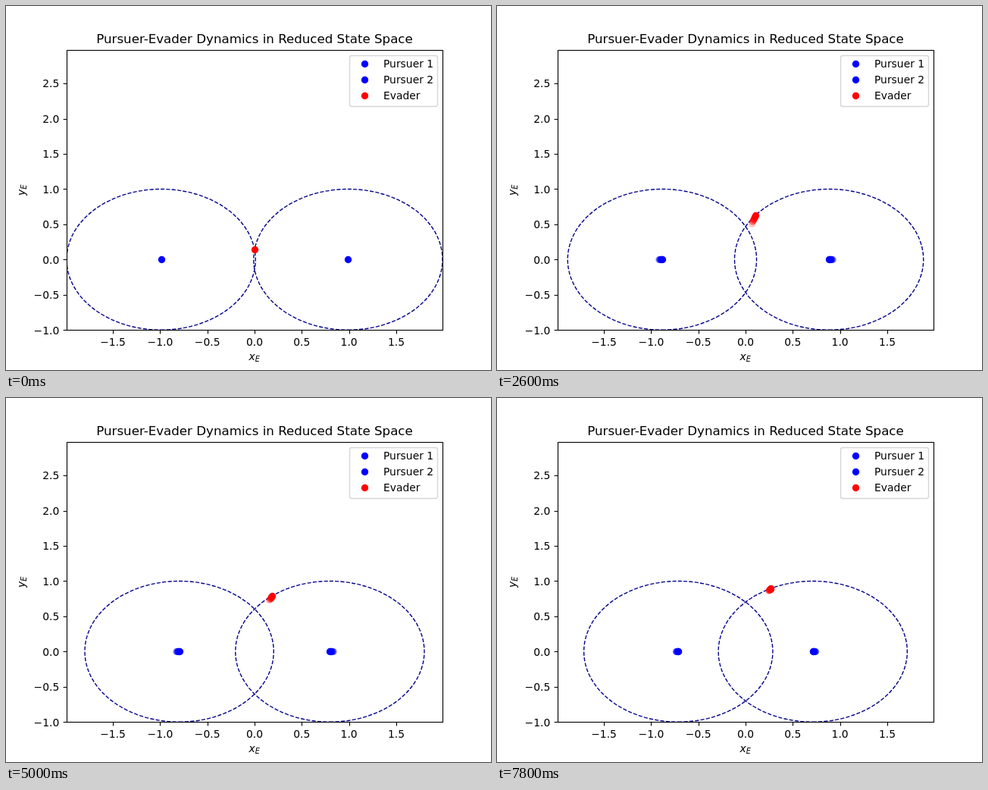
Write an HTML page with a canvas that moves like this. It is 640 by 480 pixels and loops after 8 s.

```html
<!DOCTYPE html>
<html lang="en">
<head>
<meta charset="utf-8">
<title>Pursuer-Evader Dynamics</title>
<style>
html, body { margin: 0; width: 100%; height: 100%; overflow: hidden; background: #fff; }
canvas { display: block; }
</style>
</head>
<body>
<canvas id="plot" width="640" height="480"></canvas>
<script>
const ctx = document.getElementById('plot').getContext('2d');
const STEP = 200, STEPS = 40, TRAIL = 6;
const SCALE_X = 496 / 3.98, SCALE_Y = 369.6 / 3.98;
const LEFT = 80, RIGHT = 576, TOP = 58, BOTTOM = 427;
const START = 0.99; // initial distance of each pursuer from the centre
const px = x => 328 + x * SCALE_X;
const py = y => 427.2 - (y + 1) * SCALE_Y;
const snap = v => Math.round(v) + 0.5;

function text(str, x, y, align = 'left', size = 13.89, style = '') {
  ctx.font = `${style} ${size}px "DejaVu Sans", sans-serif`;
  ctx.textAlign = align;
  ctx.fillStyle = '#000';
  ctx.fillText(str, x, y);
}

function line(x1, y1, x2, y2) {
  ctx.beginPath();
  ctx.moveTo(x1, y1);
  ctx.lineTo(x2, y2);
  ctx.stroke();
}

function dot(x, y, color, alpha = 1) {
  ctx.globalAlpha = alpha;
  ctx.fillStyle = ctx.strokeStyle = color;
  ctx.lineWidth = 1.39;
  ctx.beginPath();
  ctx.arc(snap(x), snap(y), 4, 0, 2 * Math.PI);
  ctx.fill();
  ctx.stroke();
  ctx.globalAlpha = 1;
}

// Pursuers close in while the evader slides along the right capture circle.
function stateAt(step) {
  const t = step * STEP / 1000;
  const closed = 0.0436 * t - 0.00102 * t * t;
  const pursuer = START - closed;
  const evader = 0.965 * closed;
  return { pursuer, evader, height: Math.sqrt(1 - (pursuer - evader) ** 2) };
}

function captureCircle(x) {
  ctx.beginPath();
  ctx.ellipse(px(x), py(0), SCALE_X, SCALE_Y, 0, Math.PI / 2, -1.5 * Math.PI, true);
  ctx.stroke();
}

function drawScene(step) {
  ctx.save();
  ctx.beginPath();
  ctx.rect(LEFT, TOP, RIGHT - LEFT, BOTTOM + 0.5 - TOP);
  ctx.clip();
  const { pursuer } = stateAt(step);
  ctx.strokeStyle = '#00008b';
  ctx.lineWidth = 1.39;
  ctx.setLineDash([5.14, 2.22]);
  captureCircle(-pursuer);
  captureCircle(pursuer);
  ctx.setLineDash([]);
  const first = Math.max(0, step - TRAIL + 1);
  for (let i = first; i <= step; i++) {
    const s = stateAt(i), alpha = (i - first + 1) / (step - first + 1);
    dot(px(-s.pursuer), py(0), '#00f', alpha);
    dot(px(s.pursuer), py(0), '#00f', alpha);
    dot(px(s.evader), py(s.height), '#f00', alpha);
  }
  ctx.restore();
}

function variable(name, x, y) {
  text(name, x, y, 'left', 13.89, 'italic');
  text('E', x + 8.3, y + 2.2, 'left', 9.72, 'italic');
}

function drawAxes() {
  ctx.strokeStyle = '#000';
  ctx.lineWidth = 1.11;
  ctx.strokeRect(LEFT + 0.5, TOP + 0.5, RIGHT - LEFT, BOTTOM - TOP);
  const label = v => v.toFixed(1).replace('-', '\u2212');
  for (let v = -1.5; v <= 1.5; v += 0.5) {
    const x = snap(px(v));
    line(x, BOTTOM + 0.5, x, BOTTOM + 5.4);
    text(label(v), px(v), 448, 'center');
  }
  for (let v = -1; v <= 2.5; v += 0.5) {
    const y = snap(py(v));
    line(LEFT + 0.5, y, LEFT - 4.4, y);
    text(label(v), 70.3, py(v) + 5.3, 'right');
  }
  text('Pursuer-Evader Dynamics in Reduced State Space', 328, 49.3, 'center', 16.67);
  variable('x', 320.5, 467);
  ctx.save();
  ctx.translate(25, 250);
  ctx.rotate(-Math.PI / 2);
  variable('y', 0, 0);
  ctx.restore();
}

function drawLegend() {
  ctx.beginPath();
  ctx.roundRect(453.5, 65.5, 116, 67, 2.8);
  ctx.fillStyle = 'rgba(255,255,255,0.8)';
  ctx.strokeStyle = 'rgba(204,204,204,0.8)';
  ctx.lineWidth = 1.39;
  ctx.fill();
  ctx.stroke();
  [['Pursuer 1', '#00f'], ['Pursuer 2', '#00f'], ['Evader', '#f00']].forEach(([name, color], i) => {
    dot(473, 76 + 21 * i, color);
    text(name, 498, 81 + 21 * i);
  });
}

const startTime = performance.now();
function frame() {
  const elapsed = Math.max(0, performance.now() - startTime);
  ctx.fillStyle = '#fff';
  ctx.fillRect(0, 0, 640, 480);
  drawScene(Math.floor(elapsed / STEP) % STEPS);
  drawAxes();
  drawLegend();
  requestAnimationFrame(frame);
}
frame();
</script>
</body>
</html>
```
